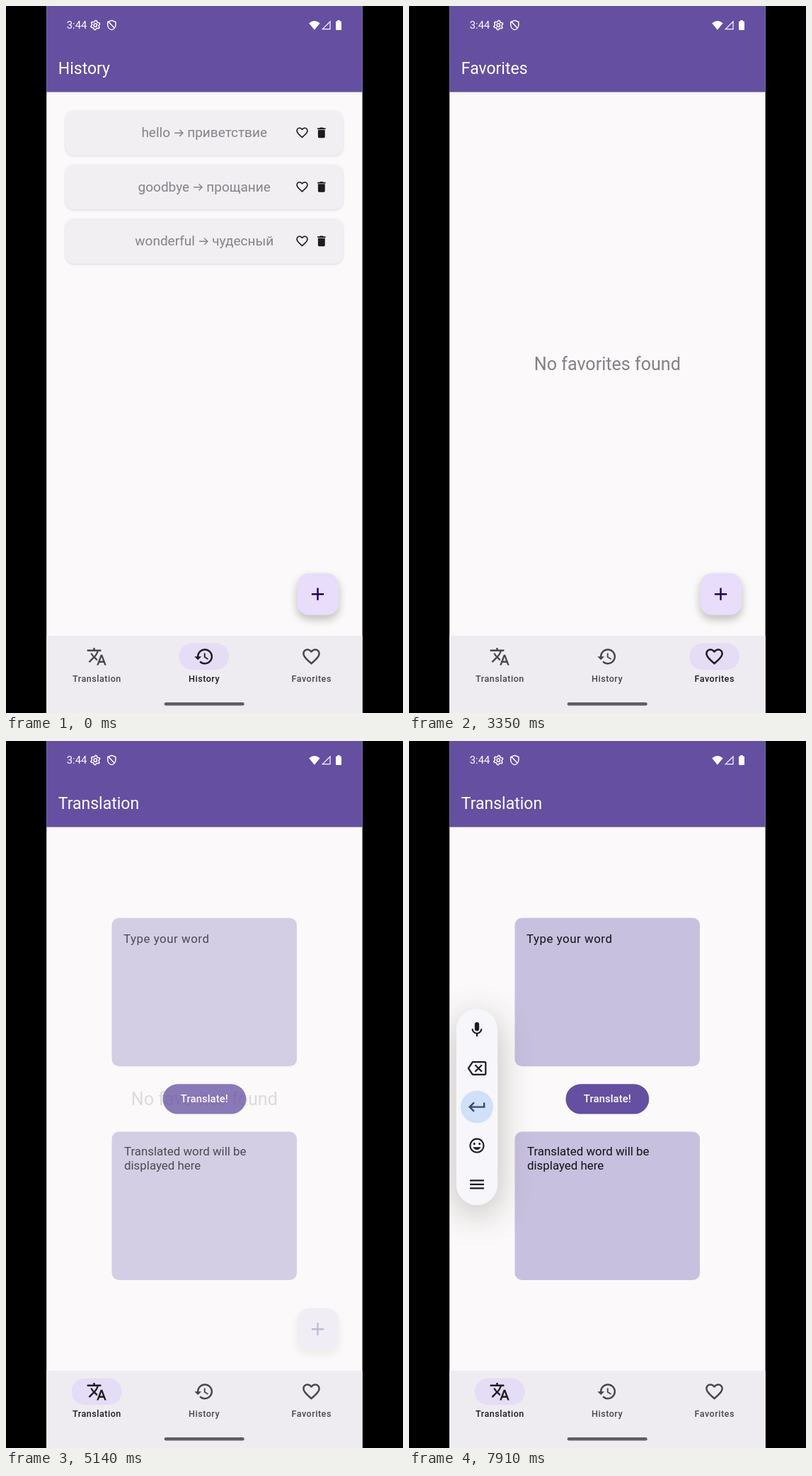
An HTML page with a canvas that plays this animation: 561 by 998 pixels, repeating every 8000 ms.

```html
<!DOCTYPE html>
<html lang="en">
<head>
<meta charset="utf-8">
<title>Translator app</title>
<style>
html, body { margin: 0; width: 100%; height: 100%; overflow: hidden; background: #000; }
canvas { display: block; }
</style>
</head>
<body>
<canvas id="stage" width="561" height="998"></canvas>
<script>
const W = 561, H = 998, LOOP = 8000;
const LEFT = 57.2, RIGHT = 503.6;
const INK = '#1c1b1f', PURPLE = '#644fa1';

const screen = document.getElementById('stage').getContext('2d');
const buffer = document.createElement('canvas');
buffer.width = W;
buffer.height = H;
const layerCtx = buffer.getContext('2d');
let g = screen;

// 24-unit icon outlines
const ICONS = {
  translate: 'M12.87 15.07l-2.54-2.51.03-.03c1.74-1.94 2.98-4.17 3.71-6.53H17V4h-7V2H8v2H1v1.99h11.17C11.5 7.92 10.44 9.75 9 11.35 8.07 10.32 7.3 9.19 6.69 8h-2c.73 1.63 1.73 3.17 2.98 4.56l-5.09 5.02L4 19l5-5 3.11 3.11.76-2.04zM18.5 10h-2L12 22h2l1.12-3h4.75L21 22h2l-4.5-12zm-2.62 7l1.62-4.33L19.12 17h-3.24z',
  history: 'M13 3c-4.97 0-9 4.03-9 9H1l3.89 3.89.07.14L9 12H6c0-3.87 3.13-7 7-7s7 3.13 7 7-3.13 7-7 7c-1.93 0-3.68-.79-4.94-2.06l-1.42 1.42C8.27 19.99 10.51 21 13 21c4.97 0 9-4.03 9-9s-4.03-9-9-9zm-1 5v5l4.28 2.54.72-1.21-3.5-2.08V8H12z',
  heart: 'M16.5 3c-1.74 0-3.41.81-4.5 2.09C10.91 3.81 9.24 3 7.5 3 4.42 3 2 5.42 2 8.5c0 3.78 3.4 6.86 8.55 11.54L12 21.35l1.45-1.32C18.6 15.36 22 12.28 22 8.5 22 5.42 19.58 3 16.5 3zm-4.4 15.55l-.1.1-.1-.1C7.14 14.24 4 11.39 4 8.5 4 6.5 5.5 5 7.5 5c1.54 0 3.04.99 3.57 2.36h1.87C13.46 5.99 14.96 5 16.5 5c2 0 3.5 1.5 3.5 3.5 0 2.89-3.14 5.74-7.9 10.05z',
  trash: 'M6 19c0 1.1.9 2 2 2h8c1.1 0 2-.9 2-2V7H6v12zM19 4h-3.5l-1-1h-5l-1 1H5v2h14V4z',
  plus: 'M19 13h-6v6h-2v-6H5v-2h6V5h2v6h6z',
  mic: 'M12 14c1.66 0 3-1.34 3-3V5c0-1.66-1.34-3-3-3S9 3.34 9 5v6c0 1.66 1.34 3 3 3zm5-3c0 2.76-2.24 5-5 5s-5-2.24-5-5H5c0 3.53 2.61 6.43 6 6.92V21h2v-3.08c3.39-.49 6-3.39 6-6.92h-2z',
  erase: 'M22 3H7c-.69 0-1.23.35-1.59.88L0 12l5.41 8.11c.36.53.9.89 1.59.89h15c1.1 0 2-.9 2-2V5c0-1.1-.9-2-2-2zm0 16H7.07L2.4 12l4.66-7H22v14zm-11.59-2L14 13.41 17.59 17 19 15.59 15.41 12 19 8.41 17.59 7 14 10.59 10.41 7 9 8.41 12.59 12 9 15.59z',
  enter: 'M19.5 7v4H5.83l3.58-3.59L8 6l-6 6 6 6 1.41-1.41L5.83 13H21.5V7z',
  smile: 'M12 2a10 10 0 1 0 0 20a10 10 0 1 0 0-20zm0 18a8 8 0 1 1 0-16a8 8 0 1 1 0 16zM15.5 8a1.5 1.5 0 1 0 0 3a1.5 1.5 0 1 0 0-3zM8.5 8a1.5 1.5 0 1 0 0 3a1.5 1.5 0 1 0 0-3zM12 17.5c2.33 0 4.31-1.46 5.11-3.5H6.89c.8 2.04 2.78 3.5 5.11 3.5z',
  menu: 'M3 18h18v-2H3v2zm0-5h18v-2H3v2zm0-7v2h18V6H3z',
  shield: 'M12 2.5L4 5.5v6c0 4.6 3.4 8.9 8 10 4.6-1.1 8-5.4 8-10v-6zM5 4.5L18 18.5'
};
for (const k in ICONS) ICONS[k] = new Path2D(ICONS[k]);

const clamp = v => Math.max(0, Math.min(1, v));
const span = (t, start, length) => clamp((t - start) / length);
const mix = (a, b, p) => a + (b - a) * p;

// cubic-bezier(.4, 0, .2, 1)
function ease(x) {
  if (x <= 0 || x >= 1) return clamp(x);
  let lo = 0, hi = 1, s = 0.5;
  for (let i = 0; i < 24; i++) {
    s = (lo + hi) / 2;
    const bx = 1.2 * s * (1 - s) ** 2 + 0.6 * s * s * (1 - s) + s ** 3;
    if (bx < x) lo = s; else hi = s;
  }
  return 3 * s * s * (1 - s) + s ** 3;
}

function text(str, x, y, size, color, { weight = 400, align = 'left', gap = 0 } = {}) {
  g.font = `${weight} ${size}px Roboto, sans-serif`;
  g.letterSpacing = gap + 'px';
  g.textAlign = align;
  g.fillStyle = color;
  g.fillText(str, x, y);
}

function box(x, y, w, h, r, color) {
  g.beginPath();
  g.roundRect(x, y, w, h, r);
  g.fillStyle = color;
  g.fill();
}

function shadow(color, blur, dy) {
  g.shadowColor = color;
  g.shadowBlur = blur;
  g.shadowOffsetY = dy;
}

const noShadow = () => shadow('transparent', 0, 0);

function icon(name, x, y, scale, color, stroke = 0) {
  g.save();
  g.translate(x, y);
  g.scale(scale, scale);
  g.translate(-12, -12);
  if (stroke) {
    g.strokeStyle = color;
    g.lineWidth = stroke;
    g.stroke(ICONS[name]);
  } else {
    g.fillStyle = color;
    g.fill(ICONS[name]);
  }
  g.restore();
}

// Draws a group and blends it as one picture
function layer(alpha, draw) {
  if (alpha <= 0) return;
  g = layerCtx;
  g.clearRect(0, 0, W, H);
  draw();
  g = screen;
  g.globalAlpha = alpha;
  g.drawImage(buffer, 0, 0);
  g.globalAlpha = 1;
}

// Touch feedback inside a rounded shape
function ripple(age, x, y, w, h, r) {
  if (age < 0 || age > 2150) return;
  const alpha = 0.14 * clamp(age / 150) * (1 - span(age, 550, 1600));
  g.save();
  g.beginPath();
  g.roundRect(x, y, w, h, r);
  g.clip();
  g.beginPath();
  g.arc(x + w / 2, y + h / 2, mix(0.3, 1, ease(age / 450)) * Math.hypot(w, h) / 2, 0, 7);
  g.fillStyle = `rgba(28,27,31,${alpha})`;
  g.fill();
  g.restore();
}

function gear(x, y) {
  g.beginPath();
  for (let i = 0; i < 24; i++) {
    const a = i * Math.PI / 12;
    const r = i % 4 < 2 ? 6.6 : 5;
    g.lineTo(x + r * Math.sin(a), y - r * Math.cos(a));
  }
  g.closePath();
  g.moveTo(x + 2.2, y);
  g.arc(x, y, 2.2, 0, 7);
  g.strokeStyle = '#fff';
  g.lineWidth = 1.5;
  g.stroke();
}

function header(title) {
  g.fillStyle = PURPLE;
  g.fillRect(LEFT, 0, RIGHT - LEFT, 121.5);
  text('3:44', 85.8, 32, 14.8, '#fff');
  gear(126.3, 27);
  icon('shield', 149.3, 27, 0.7, '#fff', 2.1);
  g.fillStyle = '#fff';
  g.beginPath();
  g.moveTo(435.8, 33.8);
  g.lineTo(428.2, 24.2);
  g.quadraticCurveTo(435.8, 17.6, 443.6, 24.2);
  g.fill();
  g.beginPath();
  g.moveTo(447.3, 32.6);
  g.lineTo(458, 32.6);
  g.lineTo(458, 22);
  g.closePath();
  g.strokeStyle = '#fff';
  g.lineWidth = 1.2;
  g.stroke();
  box(466, 21.5, 8, 12.5, 1.2, '#fff');
  g.fillRect(468.3, 20, 3.4, 2);
  text(title, 73.8, 96, 23, '#fff');
}

function fab(pressAge) {
  shadow('rgba(40,38,20,.28)', 12, 6);
  box(411.3, 800.7, 59, 59, 17, '#e8ddfa');
  noShadow();
  ripple(pressAge, 411.3, 800.7, 59, 59, 17);
  icon('plus', 440.5, 830.2, 1.23, '#21005d');
}

function arrow(x, y) {
  g.beginPath();
  g.moveTo(x - 6, y);
  g.lineTo(x + 5.5, y);
  g.moveTo(x + 1.2, y - 4.6);
  g.lineTo(x + 5.8, y);
  g.lineTo(x + 1.2, y + 4.6);
  g.strokeStyle = '#85828a';
  g.lineWidth = 1.4;
  g.stroke();
}

const WORDS = [['hello', 'приветствие'], ['goodbye', 'прощание'], ['wonderful', 'чудесный']];

function historyScreen() {
  const size = 19, gap = 24.2;
  WORDS.forEach(([from, to], i) => {
    const y = 147.2 + i * 76.5, mid = y + 31.6;
    shadow('rgba(90,85,150,.2)', 2.5, 1);
    box(83.5, y, 393, 63.8, 12.7, '#f1eff2');
    noShadow();
    g.font = `400 ${size}px Roboto, sans-serif`;
    g.letterSpacing = '0px';
    const w1 = g.measureText(from).width, w2 = g.measureText(to).width;
    const x = 280.2 - (w1 + gap + w2) / 2;
    text(from, x, y + 38, size, '#85828a');
    text(to, x + w1 + gap, y + 38, size, '#85828a');
    arrow(x + w1 + gap / 2, mid + 0.5);
    icon('heart', 418.5, mid, 0.82, INK);
    icon('trash', 445.8, mid, 0.82, INK);
  });
  fab(-1);
}

function favoritesScreen(pressAge) {
  text('No favorites found', 280.3, 514, 25.1, '#838087', { align: 'center' });
  fab(pressAge);
}

function translationScreen(cursor) {
  const ink = '#111013';
  box(149.5, 249.8, 261.5, 209.5, 10, '#c8c0df');
  box(149.5, 551.5, 261.5, 209.5, 10, '#c8c0df');
  text('Type your word', 166, 285, 16.88, ink, { gap: 0.53 });
  text('Translated word will be', 167, 585, 16.88, ink);
  text('displayed here', 167, 605, 16.88, ink);
  box(221.5, 484.3, 117.7, 42.2, 21.1, PURPLE);
  text('Translate!', 280.3, 510, 14.77, '#fff', { weight: 500, align: 'center', gap: 0.1 });
  if (cursor) {
    g.fillStyle = PURPLE;
    g.fillRect(166, 269, 2, 20);
  }
}

const TABS = [['Translation', 'translate', 128.2], ['History', 'history', 279.8], ['Favorites', 'heart', 431.5]];

function navBar(t) {
  const toFav = span(t, 1290, 200), toTrans = span(t, 4310, 190);
  const chosen = [toTrans, 1 - toFav, toFav * (1 - toTrans)];
  g.fillStyle = '#eeecf1';
  g.fillRect(LEFT, 889, RIGHT - LEFT, 109);
  TABS.forEach(([label, name, x], i) => {
    const s = chosen[i], w = 70.8 * s;
    g.globalAlpha = s;
    if (s > 0) box(x - w / 2, 899.6, w, 37.6, Math.min(18.8, w / 2), '#e5dcf6');
    g.globalAlpha = 1;
    if (i === 2) ripple(t - 1150, x - 35.4, 899.6, 70.8, 37.6, 18.8);
    const color = `rgb(${mix(73, 28, s)},${mix(69, 27, s)},${mix(79, 31, s)})`;
    icon(name, x, 918.3, 1.231, color);
    text(label, x + 0.2, 954, 12.6, color, { weight: 500, align: 'center', gap: 0.5 });
  });
  box(223.7, 983, 113, 4.6, 2.3, '#5f5d62');
}

const TOOLS = [['mic', 1.06], ['erase', 1.12], ['enter', 1.2], ['smile', 1.06], ['menu', 1.1]];

function toolbar(p) {
  const scale = mix(0.707, 1, p);
  g.save();
  g.translate(mix(73, 96, p), mix(577, 516.6, p));
  g.scale(scale, scale);
  shadow('rgba(60,55,50,.3)', 48 * scale, 12 * scale);
  box(-29.2, -138.5, 58.4, 277, 29.2, '#f7f6fa');
  noShadow();
  box(-23, -23, 46, 46, 23, '#d0e0f9');
  TOOLS.forEach(([name, size], i) => {
    icon(name, 0, (i - 2) * 54.6, size, i === 2 ? '#35496b' : INK);
  });
  g.restore();
}

function render(t) {
  const fadeFav = ease(span(t, 1290, 1650));
  const fadeTrans = ease(span(t, 4310, 1730));
  const title = t < 1290 ? 'History' : t < 4310 ? 'Favorites' : 'Translation';

  g = screen;
  g.fillStyle = '#000';
  g.fillRect(0, 0, W, H);
  g.save();
  g.beginPath();
  g.rect(57, 0, 447, H);
  g.clip();
  g.fillStyle = '#fbf9f9';
  g.fillRect(LEFT, 0, RIGHT - LEFT, H);

  layer(1 - fadeFav, historyScreen);
  layer(fadeFav * (1 - fadeTrans), () => favoritesScreen(t - 4070));
  layer(fadeTrans, () => translationScreen(t >= 6460 && t < 7760));
  header(title);
  navBar(t);
  if (t >= 6930) {
    const p = ease(span(t, 6930, 790));
    layer(mix(0.2, 1, ease(span(t, 6930, 500))), () => toolbar(p));
  }
  g.restore();
}

const begin = performance.now();
function frame() {
  render((performance.now() - begin) % LOOP);
  requestAnimationFrame(frame);
}
frame();
</script>
</body>
</html>
```
